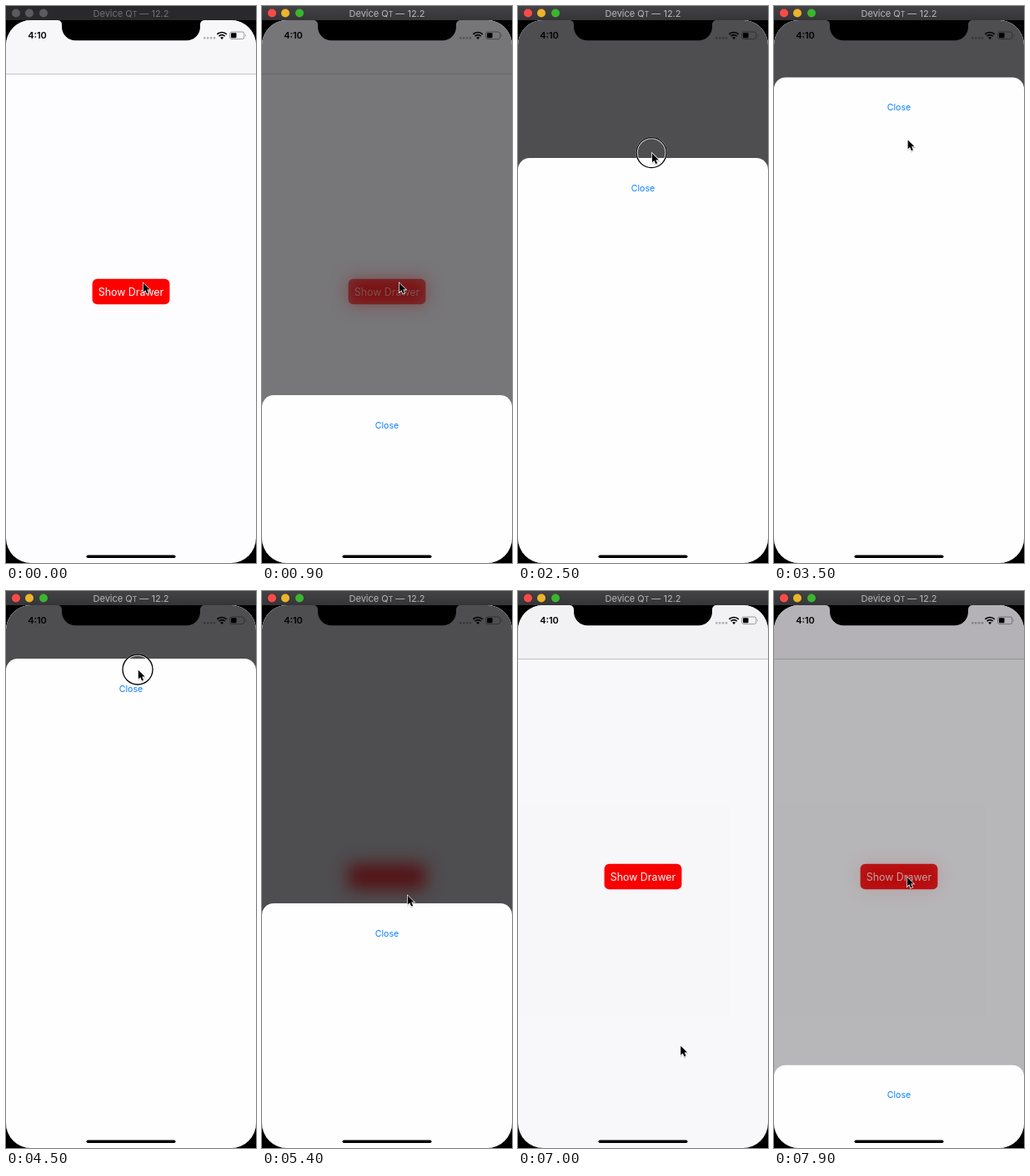
An HTML page that plays this animation: 300x667 px, repeating every 8 s.

```html
<!DOCTYPE html>
<html lang="en">
<head>
<meta charset="utf-8">
<title>Drawer demo</title>
<style>
  html, body { margin: 0; height: 100%; overflow: hidden; background: #000; }
  svg { display: block; width: 100vw; height: 100vh; }
  text { font-family: Inter, Roboto, sans-serif; text-anchor: middle; }
</style>
</head>
<body>
<svg viewBox="0 0 300 667">
  <defs>
    <linearGradient id="chrome" x2="0" y2="1">
      <stop stop-color="#434245"/><stop offset="1" stop-color="#353437"/>
    </linearGradient>
    <clipPath id="screen"><rect y="17" width="300" height="650" rx="30"/></clipPath>
    <filter id="blur" x="-50%" y="-150%" width="200%" height="400%" color-interpolation-filters="sRGB">
      <feGaussianBlur stdDeviation="10"/>
    </filter>
    <filter id="shadow" x="-50%" y="-50%" width="200%" height="200%">
      <feDropShadow dx="0" dy="1" stdDeviation=".8" flood-opacity=".35"/>
    </filter>
    <rect id="button" x="103.6" y="326.8" width="92.8" height="30.4" rx="5.8"/>
  </defs>

  <rect id="bar" width="300" height="17"/>
  <g id="lights"><circle cx="12" cy="8.5" r="5"/><circle cx="28" cy="8.5" r="5"/><circle cx="45" cy="8.5" r="5"/></g>
  <text id="title" x="150" y="12.5" font-size="11">Device Q<tspan font-size="8.5">T</tspan> — 12.2</text>

  <g clip-path="url(#screen)">
    <rect y="17" width="300" height="650" fill="#fdfcfe"/>
    <rect y="17" width="300" height="64" fill="#f7f6f9"/>
    <rect y="81" width="300" height="1" fill="#c4c3c6"/>
    <use href="#button" fill="#fe0000"/>
    <text x="150" y="346.6" font-size="12.4" fill="#fff">Show Drawer</text>

    <g id="dim">
      <rect y="17" width="300" height="650" fill="#4e4d50"/>
      <use href="#button" fill="#531214" filter="url(#blur)"/>
    </g>

    <g id="drawer">
      <rect width="300" height="700" rx="14" fill="#fefefe"/>
      <text x="150" y="39.8" font-size="10.6" fill="#087ffb">Close</text>
    </g>

    <path d="M62 17a5 5 0 0 1 5 5v3a16.3 16.3 0 0 0 16.3 16.3H216.7A16.3 16.3 0 0 0 233 25v-3a5 5 0 0 1 5-5z"/>
    <text x="37.5" y="39.2" font-size="11" font-weight="600">4:10</text>
    <path d="M238.3 38.3h12" stroke="#000" stroke-opacity=".3" stroke-width="2.7" stroke-linecap="round" stroke-dasharray="0 3.9"/>
    <path d="M253.4 33.9a8 8 0 0 1 11.4 0M255.5 36.2a5 5 0 0 1 7.2 0" fill="none" stroke="#000" stroke-width="1.6"/>
    <path d="M259.1 40l-2-2.2a3 3 0 0 1 4 0z"/>
    <rect x="268.6" y="31" width="17.2" height="8.6" rx="2.4" fill="none" stroke="#000" stroke-opacity=".42" stroke-width=".9"/>
    <rect x="270" y="32.3" width="6.5" height="6" rx="1"/>
    <path d="M287 33.8q1.4 1.5 0 3z" fill-opacity=".5"/>
    <rect x="96.5" y="657.5" width="107" height="3.6" rx="1.8"/>
  </g>

  <g id="pointer">
    <g id="touch" fill="none">
      <circle r="17.6" stroke="#fff" stroke-opacity=".75" stroke-width="2.6"/>
      <circle r="18" stroke="#000" stroke-width="1.3"/>
    </g>
    <path d="M0 0V12.4L2.8 9.8 4.9 14.6 7.2 13.6 5.1 8.9H9z" transform="translate(.8 .8) scale(.87)"
          stroke="#fff" stroke-width="1.6" paint-order="stroke" filter="url(#shadow)"/>
  </g>
</svg>

<script>
const LOOP = 8000, STEP = 100;
const HIDDEN = 667, HALF = 374, RAISED = 173, FULL = 81;
const $ = id => document.getElementById(id);
const clamp = u => Math.min(1, Math.max(0, u));
const smooth = u => u * u * (3 - 2 * u);
const out = power => u => 1 - (1 - u) ** power;

// A value over time: each move eases from wherever the earlier ones left it.
const track = (first, ...moves) => t => moves.reduce(
  (v, { start, span, to, ease = smooth }) => v + (to - v) * ease(clamp((t - start) / span)), first);
const move = (phase, to, ease) => ({ ...phase, to, ease });

const open = { start: 800, span: 570 };
const lift = { start: 1950, span: 630 };
const snap = { start: 3150, span: 550 };
const lower = { start: 4650, span: 750 };
const shut = { start: 6380, span: 600 };
const fade = { start: 6800, span: 206 };
const reopen = { start: 7862, span: 570 };

const drawerY = track(HIDDEN,
  move(open, HALF, out(6)), move(lift, RAISED), move(snap, FULL, out(3)),
  move(lower, HALF), move(shut, HIDDEN), move(reopen, HALF, out(6)));

const dimness = track(0,
  move(open, 1, out(7.4)), move(fade, 0, u => u), move(reopen, 1, out(7.4)));

const path = [
  [{ start: 900, span: 500 }, 165, 370],
  [{ start: 1700, span: 100 }, 163, 383],
  [lift, 160, 166],
  [{ start: 3300, span: 1100 }, 158, 94],
  [lower, 174, 364],
  [{ start: 5700, span: 300 }, 160, 386],
  [{ start: 6400, span: 300 }, 199, 570],
  [{ start: 6790, span: 1000 }, 159, 342],
];
const pointerX = track(164, ...path.map(([phase, x]) => move(phase, x)));
const pointerY = track(331, ...path.map(([phase, , y]) => move(phase, y)));

const within = (t, from, to) => t >= from && t < to;
const isPressed = t =>
  within(t, open.start - 200, open.start) ||
  within(t, lift.start - 150, snap.start + 50) ||
  within(t, lower.start - 250, lower.start + 550) ||
  within(t, shut.start - 380, shut.start - 180) ||
  within(t, reopen.start - 262, reopen.start - 62);

function draw(now) {
  const t = Math.floor(now % LOOP / STEP) * STEP;
  const active = t >= 400;
  const colors = active ? ['#fc4b47', '#eab52b', '#3bb52f'] : Array(3).fill('#5b5a5c');

  $('bar').setAttribute('fill', active ? 'url(#chrome)' : '#29282a');
  $('title').setAttribute('fill', active ? '#b9b8bb' : '#737274');
  [...$('lights').children].forEach((c, i) => c.setAttribute('fill', colors[i]));

  $('drawer').setAttribute('transform', `translate(0 ${drawerY(t)})`);
  $('dim').setAttribute('opacity', dimness(t));
  $('pointer').setAttribute('transform', `translate(${pointerX(t)} ${pointerY(t)})`);
  $('touch').setAttribute('visibility', isPressed(t) ? 'visible' : 'hidden');
}

const origin = performance.now();
function tick() {
  draw(performance.now() - origin);
  requestAnimationFrame(tick);
}
tick();
</script>
</body>
</html>
```
